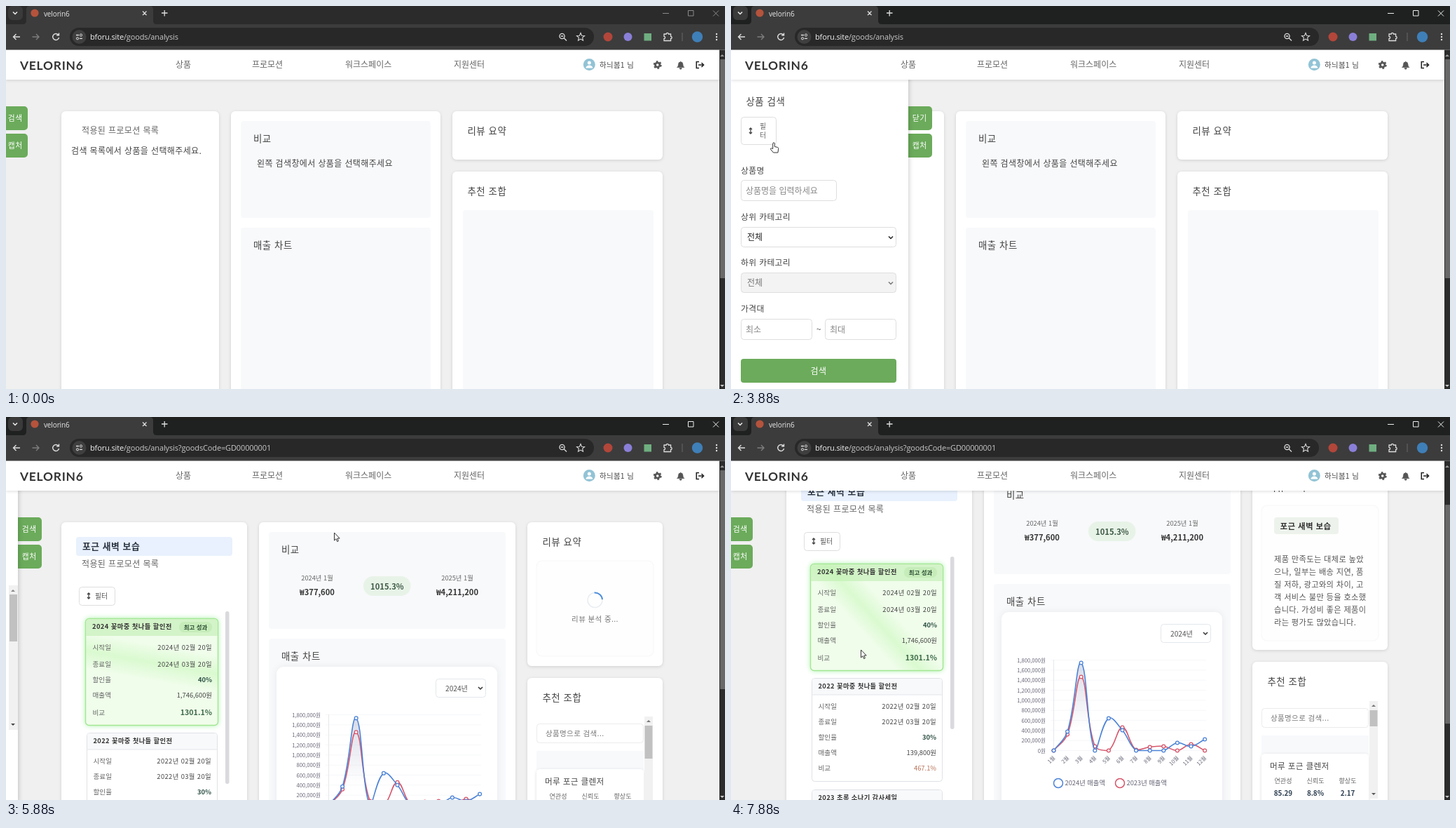
Recreate the animation shown at these times as an HTML page. Size 1026 by 546 pixels, loop 8000 ms.

```html
<!DOCTYPE html>
<html lang="ko">
<head>
<meta charset="utf-8">
<style>
html, body { margin: 0; width: 100%; height: 100%; overflow: hidden; background: #f0f0f0 }
svg { display: block }
text { font-family: "Noto Sans CJK KR", "Noto Sans CJK", sans-serif; letter-spacing: .38px; white-space: pre }
.b { font-weight: 700 }
.m { text-anchor: middle }
.e { text-anchor: end }
.n { letter-spacing: 0 }
.h { letter-spacing: .55px }
.u { font-family: "Open Sans", sans-serif; letter-spacing: -.14px }
.logo { font-family: Lato, sans-serif; letter-spacing: .75px; font-weight: 700 }
.card { filter: drop-shadow(0 1px 2px #0002) }
.soft { filter: drop-shadow(0 0 5px #0001) }
.panel { filter: drop-shadow(1px 0 3px #0003) }
.glow { filter: drop-shadow(0 0 3.5px #90ee90b0) }
</style>
</head>
<body>
<svg id="stage" width="1026" height="546" viewBox="0 0 1026 546"></svg>
<script>
const stage = document.getElementById('stage');
const TICKS = 56, LOOP = 8000, GREEN = '#6bab5b', PALE = '#f8f9fb';
const PRODUCT = '포근 새벽 보습';

const T = (x, y, s, size = 12, fill = '#444', cls = '') =>
  `<text x="${x}" y="${y}" font-size="${size}" fill="${fill}" class="${cls}">${s}</text>`;
const R = (x, y, w, h, fill, r = 0, more = '') =>
  `<rect x="${x}" y="${y}" width="${w}" height="${h}" rx="${r}" fill="${fill}" ${more}/>`;
const C = (x, y, r, fill, more = '') => `<circle cx="${x}" cy="${y}" r="${r}" fill="${fill}" ${more}/>`;
const L = (d, stroke, w = 1.3, fill = 'none') =>
  `<path d="${d}" fill="${fill}" stroke="${stroke}" stroke-width="${w}"/>`;
const G = (x, y, body, more = '') => `<g transform="translate(${x} ${y}) ${more}">${body}</g>`;
const card = (x, y, w, h) => R(x, y, w, h, '#fff', 6, 'class="card"');
const outline = (x, y, w, h, fill = '#fff', line = '#dedede') =>
  R(x + .5, y + .5, w - 1, h - 1, fill, 4, `stroke="${line}"`);
const chevron = (x, y, color = '#333') => G(x, y, L('M-3-1.5 0 1.5 3-1.5', color, 1.5));
const tri = (x, y, up, color) => L(`M${x - 3} ${y}h6l-3 ${up ? -3 : 3}z`, 'none', 0, color);
const updown = (x, y) => L(`M${x} ${y - 4}v8m-2-6 2-2 2 2m-4 4 2 2 2-2`, '#444', 1.3);

// Linear interpolation through [tick, ...values] keys
function at(k, keys) {
  const i = keys.findIndex(key => key[0] >= k);
  if (i < 0) return keys.at(-1).slice(1);
  if (i === 0) return keys[0].slice(1);
  const a = keys[i - 1], b = keys[i], p = (k - a[0]) / (b[0] - a[0]);
  return a.slice(1).map((v, j) => v + (b[j + 1] - v) * p);
}

const cursorKeys = [[1, 955, 420], [3, 700, 330], [5, 330, 230], [7, 60, 165], [9, 14, 158], [10, 40, 158],
  [11, 88, 158], [14, 75, 170], [17, 60, 190], [20, 56, 184], [24, 57, 182], [27, 61, 195], [29, 125, 514],
  [30, 125, 514], [32, 123, 330], [33, 121, 284], [36, 121, 284], [39, 264, 158], [40, 370, 158],
  [41, 468, 165], [47, 471, 165], [55, 185, 332]];
const handSpans = [[8, 9], [17, 27], [29, 30], [33, 36], [39, 39]];
const edgeKeys = [[8, -3], [9, 30], [10, 195], [11, 251], [12, 253], [39, 253], [40, 130], [41, 17], [42, -3]];
const scrollKeys = [[42, 0], [44, 26], [46, 69], [47, 78]];
const shineKeys = [[36, 150, 310, 20], [41, 180, 345, 10], [46, 290, 430, -26], [55, 215, 377, 48]];

const defs = `<defs>
  <linearGradient id="fade" x2="0" y2="1"><stop stop-color="#8088b0" stop-opacity=".3"/><stop offset=".75" stop-color="#8088b0" stop-opacity="0"/></linearGradient>
  <linearGradient id="bar"><stop stop-color="#6c9fe0"/><stop offset="1" stop-color="#3f70b8"/></linearGradient>
  <linearGradient id="band" x2="0" y2="1"><stop stop-color="#b9f5a8" stop-opacity="0"/><stop offset=".5" stop-color="#b9f5a8" stop-opacity=".4"/><stop offset="1" stop-color="#b9f5a8" stop-opacity="0"/></linearGradient>
  <clipPath id="promo"><rect x="114" y="288" width="188" height="151" rx="5"/></clipPath>
</defs>`;

function spinner(x, y, r, k) {
  const c = r * .707, turn = 63 * (k - 41) + (k < 36 ? 18 : 40);
  return G(x, y, C(0, 0, r, 'none', 'stroke="#e9edf2" stroke-width="1.6"') +
    L(`M${-c} ${-c}A${r} ${r} 0 0 1 ${c} ${-c}`, '#4a8ddc', 2), `rotate(${turn})`);
}

// Smooth line with neighbour-weighted control points, kept above the base line
function curve(pts, base) {
  const ctrl = pts.map((p, i) => {
    const a = pts[i - 1] || p, b = pts[i + 1] || p;
    const da = Math.hypot(p[0] - a[0], p[1] - a[1]), db = Math.hypot(b[0] - p[0], b[1] - p[1]);
    const move = f => [p[0] + f * (b[0] - a[0]), Math.min(base, p[1] + f * (b[1] - a[1]))];
    return [move(-.4 * da / (da + db)), move(.4 * db / (da + db))];
  });
  return 'M' + pts[0] + pts.slice(1).map((p, i) => `C${ctrl[i][1]} ${ctrl[i + 1][0]} ${p}`).join('');
}

function chart(k) {
  const base = 553.5, grow = 1 - (1 - Math.min(1, (k - 36) / 7)) ** 4;
  const plot = heights => heights.map((h, i) => [460.5 + 19.6 * i, base - h * grow]);
  const blue = plot([0, 27, 125, 0, 46, 29, 0, 0, 0, 11, 6, 16]);
  const red = plot([0, 23, 105, 6, 0, 33, 1, 5, 6, 0, 9, 0]);
  let out = '';
  for (let i = 0; i < 10; i++) {
    const y = base - 14.33 * i;
    out += L(`M456 ${y}H678`, '#f6f7f9', 1) +
      T(449, y + 3, i ? (i * 200000).toLocaleString('en-US') + '원' : '0원', 7.6, '#667', 'e n');
  }
  out += L(`M460.5 424V${base}`, '#e6e8ec', 1) + L(curve(blue, base) + `V${base}H460.5z`, 'none', 0, 'url(#fade)');
  for (const [pts, color] of [[red, '#d6566b'], [blue, '#4c83d6']])
    out += L(curve(pts, base), color, 1.6) +
      pts.map(p => C(...p, 2.4, '#fff', `stroke="${color}" stroke-width="1.3"`)).join('');
  for (let i = 0; i < 12; i++)
    out += G(463 + 19.6 * i, 564.5, T(0, 0, i + 1 + '월', 7.6, '#667', 'e n'), 'rotate(-45)');
  [['#4c83d6', 467, 2024], ['#d6566b', 555, 2023]].forEach(([color, x, year]) => {
    out += C(x, 600, 6.5, '#fff', `stroke="${color}" stroke-width="1.5"`) + T(x + 9.5, 603, year + '년 매출액', 9.3, '#667', 'n');
  });
  return out;
}

function frame(leftW, midX, midW, rightX, split) {
  const w = 937 - rightX;
  return card(79, 150, leftW, 700) + card(midX, 150, midW, 700) +
    R(midX + 14, 164, midW - 28, 138, PALE, 4) + R(midX + 14, 316, midW - 28, 500, PALE, 4) +
    T(midX + 32, 194, '비교', 13.4, '#444', 'h') + T(midX + 32, 346, '매출 차트', 13.4, '#444', 'h') +
    card(rightX, 150, w, split - 150) + card(rightX, split + 17, w, 500) +
    T(rightX + 21.5, 183, '리뷰 요약', 13.4, '#444', 'h') + T(rightX + 21.5, split + 50, '추천 조합', 13.4, '#444', 'h');
}

const yearBox = x => R(x - 227, 356, 315, 284, '#fff', 10, 'class="soft"') + outline(x, 373, 72, 27, '#fff', '#e3e7ec') +
  T(x + 14, 390.5, '2024년', 10.2, '#555', 'n') + chevron(x + 64, 386.5);

const reviewWait = (x, k) => R(x, 205, 207 - (x - 717), 136, '#fefefe', 8, 'stroke="#f7f7f7"') +
  spinner((x + 924) / 2, 261, 10.5, k) + T((x + 924) / 2, 292, '리뷰 분석 중...', 10.5, '#777', 'm');

const emptyPage = () => frame(225, 321, 299, 637, 219) +
  T(108, 182, '적용된 프로모션 목록', 12, '#666') + T(93, 211, '검색 목록에서 상품을 선택해주세요.') +
  T(358, 229, '왼쪽 검색창에서 상품을 선택해주세요') + R(652, 291, 272, 500, PALE, 4);

const loadingPage = k => frame(225, 321, 366, 704, 355) + R(93, 204, 186, 181, '#fff', 8, 'stroke="#f5f5f5"') +
  T(358, 229, '데이터를 불러오는 중...', 12, '#444', 'n') + yearBox(573) + spinner(504, 513, 12, k) +
  reviewWait(717, k) + R(718, 427, 206, 400, PALE, 4) + T(763, 467, '데이터를 불러오는 중...', 12, '#666', 'n');

function promoRows(year, y, [rate, sales, diff], color, big) {
  const x = big ? 123.5 : 124.5, right = big ? 294 : 293, steps = big ? [0, 24, 46, 68, 93] : [0, 22, 44.5, 66.5, 88.5];
  const values = [`${year}년 02월 20일`, `${year}년 03월 20일`, rate, sales, diff];
  return ['시작일', '종료일', '할인율', '매출액', '비교'].map((label, i) =>
    T(x, y + steps[i], label, 9.6, '#666', 'n') +
    T(right, y + steps[i], values[i], i === 4 && big ? 10.7 : 9.4, i === 4 ? color : i === 2 ? '#2d5045' : '#444',
      i < 2 ? 'e' : i === 2 || i === 4 && big ? 'e b n' : 'e n')).join('');
}

function promoHead(y, title) {
  return outline(115, y, 187, 148, '#fff', '#dfe1e5') + R(116, y + 1, 185, 23, PALE, 3) +
    L(`M115.5 ${y + 24}h186`, '#e3e5e9', 1) + T(124.5, y + 15, title, 9.3, '#333', 'b');
}

function leftColumn(k) {
  const [sx, sy, angle] = at(k, shineKeys);
  return R(100, 171, 223, 27, '#e8f1fd', 4) + T(109, 188.5, PRODUCT, 12.8, '#2b3440', 'b h') +
    T(108, 214, '적용된 프로모션 목록', 12, '#666') +
    outline(104, 242, 52, 27) + updown(118, 255) + T(127, 259, '필터', 9.8, '#555', 'n') +
    R(313, 277, 5.5, 246, '#dadade', 2.7) +
    R(113.5, 287.5, 189, 152, '#f0fdeb', 5, 'stroke="#a3e793" stroke-width="1.4" class="glow"') +
    `<g clip-path="url(#promo)">` + R(114, 288, 188, 24, '#d3f3c8') +
    G(sx, sy, R(-170, -26, 340, 52, 'url(#band)'), `rotate(${angle})`) + '</g>' +
    T(123, 302, '2024 꽃마중 첫나들 할인전', 9.4, '#333', 'b') +
    R(247, 292, 47, 15, '#c6ecba', 7) + T(270.5, 302.5, '최고 성과', 8.5, '#2f4f35', 'b m n') +
    promoRows(2024, 332, ['40%', '1,746,600원', '1301.1%'], '#3f6b4a', true) +
    promoHead(450, '2022 꽃마중 첫나들 할인전') +
    promoRows(2022, 493.5, ['30%', '139,800원', '467.1%'], '#b8735a', false) +
    promoHead(609, '2023 초록 소나기 감사세일');
}

const compare = () => T(444, 233, '2024년 1월', 9.3, '#666', 'm n') + T(444, 254, '₩377,600', 11.2, '#333', 'm b n') +
  R(510, 227, 67.5, 28, '#e8f3e8', 14) + T(543.8, 246, '1015.3%', 11.2, '#3d5a45', 'm b n') +
  T(644, 233, '2025년 1월', 9.3, '#666', 'm n') + T(644, 254, '₩4,211,200', 11.2, '#333', 'm b n');

const reviewText = ['제품 만족도는 대체로 높았', '으나, 일부는 배송 지연, 품', '질 저하, 광고와의 차이, 고',
  '객 서비스 불만 등을 호소했', '습니다. 가성비 좋은 제품이', '라는 평가도 많았습니다.'];

const review = () => R(757, 204, 167, 193, '#fefefe', 8, 'stroke="#f7f7f7"') + R(775, 221, 92, 24, '#edf3ec', 4) +
  T(783.5, 238, PRODUCT, 11.5, '#333', 'b') + reviewText.map((s, i) => T(775, 285 + 18 * i, s, 11.2, '#555')).join('');

function picks(shrunk) {
  const end = shrunk ? 566 : 622;
  const scores = [['연관성', '85.29'], ['신뢰도', '8.8%'], ['향상도', '2.17']];
  return outline(757, 437, 153, 28, '#fff', '#ebebeb') + T(770, 455, '상품명으로 검색...', 10.5, '#777') +
    R(757, 476, 153, 27, PALE) + R(757, 605, 153, 40, PALE) + R(757, 502, 153, 103, '#fff', 5, 'class="card"') +
    T(769, 523.5, '머루 포근 클렌저', 11.6) +
    scores.map(([label, value], i) => T(788 + 46 * i, 544, label, 9, '#666', 'm n') +
      T(788 + 46 * i, 561.5, value, 9.8, '#2c3e50', 'm b n')).join('') +
    R(769, 576, 130, 17, '#efefef', 8.5) + L('M777.5 576H848v17H777.5a8.5 8.5 0 0 1 0-17', 'none', 0, 'url(#bar)') +
    T(834, 588, '종합: 61.3', 9, '#b5783f', 'm n') +
    R(911, 427, 12, end - 427, '#f1f1f1') + tri(917, 435, true, '#777') +
    R(911.5, 440, 11, shrunk ? 23 : 47, '#c1c1c1') + tri(917, end - 8, false, '#555');
}

function loadedPage(k) {
  const done = k >= 47;
  return frame(265, 361, 366, 744, done ? 410 : 355) + leftColumn(k) + compare() + yearBox(613) + chart(k) +
    (done ? review() : reviewWait(757, k)) + G(0, done ? 56 : 0, picks(done));
}

const field = (x, y, w, hint) => outline(x, y, w, 30) + T(x + 7, y + 19.5, hint, 12, '#888', 'n');
const select = (y, off) => outline(14, y, 222, 29, off ? '#f3f3f3' : '#fff') +
  T(23, y + 19, '전체', 12, off ? '#777' : '#222', 'n') + chevron(228, y + 15, off ? '#777' : '#222');

const form = height => `<svg x="0" y="220" width="253" height="${height}" viewBox="0 220 253 ${height}">` +
  T(14, 239, '상품명', 11.8) + field(14, 248, 137, '상품명을 입력하세요') +
  T(14, 305, '상위 카테고리', 11.8) + select(315, false) + T(14, 370, '하위 카테고리', 11.8) + select(380, true) +
  T(14, 436, '가격대', 11.8) + field(14, 446, 102, '최소') + T(122, 465, '~') + field(134, 446, 102, '최대') +
  R(14, 503, 222, 34, GREEN, 4) + T(125, 524.5, '검색', 12, '#fff', 'm') + '</svg>';

function list(k) {
  const items = [[PRODUCT, '32,500원'], ['립밤 노을 탄력', '26,900원'], ['여성풋크림 이슬 보호', '49,800원'], ['트래블키트 노을 매끈한', '56,400원']];
  return items.map(([name, price], i) => {
    const y = 258.5 + 48.3 * i, on = !i && k >= 33;
    return R(14.5, y, 208, 41, on ? '#f3f9f1' : '#fff', 5, on ? 'stroke="#5aa450" stroke-width="1.6" class="card"' : 'class="card"') +
      T(26, y + 24.5, name, 11.7) + T(211, y + 24.5, price, 11.5, GREEN, 'e n');
  }).join('') + R(240, 240, 13, 206, '#f1f1f1') + tri(246, 249, true, '#888') + R(241, 253, 11, 67, '#c1c1c1') + tri(246, 437, false, '#444');
}

function sidebar(k) {
  const edge = at(k, edgeKeys)[0], open = k >= 9 && k < 40;
  const height = at(k, [[18, 0], [21, 326], [30, 326], [31, 0]])[0];
  const tab = (y, s) => L(`M253 ${y}h29a5 5 0 0 1 5 5v24a5 5 0 0 1-5 5h-29z`, 'none', 0, GREEN) + T(269.3, y + 21, s, 10.8, '#fff', 'm h');
  return G(edge - 253, 0, tab(143, open ? '닫기' : '검색') + tab(182, '캡처') +
    (edge < 0 ? '' : R(-4, 100, 257, 450, '#fff', 0, 'class="panel"') + T(21.5, 141, '상품 검색', 13.4, '#444', 'h') +
      outline(14, 158, 51, 40) + updown(28, 178) + T(41, 175, '필', 9.8, '#666') + T(41, 188, '터', 9.8, '#666') +
      (height ? form(height) : '') + (k >= 31 ? list(k) : '')));
}

const nav = () => R(0, 62, 1018, 43, '#fff', 0, 'class="card"') + T(20, 91, 'VELORIN6', 17.4, '#333', 'logo') +
  [[242, '상품'], [351, '프로모션'], [484, '워크스페이스'], [639, '지원센터']].map(([x, s]) => T(x, 88, s, 12, '#666', 'n')).join('') +
  C(832.3, 83.5, 8.5, '#92c3d5') + C(832.3, 81, 2.5, '#fff') + L('M827.3 88.5a5 4 0 0 1 10 0z', 'none', 0, '#fff') +
  T(847, 88, '하늬봄1 님', 10.4, '#444') +
  C(929.7, 84, 3.2, 'none', 'stroke="#555" stroke-width="2.8"') +
  C(929.7, 84, 5, 'none', 'stroke="#555" stroke-width="2" stroke-dasharray="2.6 2.64"') +
  L('M957.5 87.5q2-1.5 2-4.5a3.2 3.2 0 0 1 6.4 0q0 3 2 4.5zM961 88.5h3.4a1.7 1.7 0 0 1-3.4 0M962.7 78.5v2', '#555', .6, '#555') +
  L('M989 79.5h-3.7v9h3.7M988 84h7.5m-3-3 3 3-3 3', '#222', 1.6);

function browser(k) {
  const active = k >= 9, ink = active ? '#eee' : '#8a8a8a';
  const url = 'bforu.site<tspan fill="#c8c8c8">/goods/analysis' + (k >= 34 ? '?goodsCode=GD00000001' : '') + '</tspan>';
  return R(0, 0, 1026, 27, active ? '#1f2020' : '#2b2b2b') + R(0, 26, 1026, 36.5, '#3c3c3c') +
    R(3, 0, 21, 20, '#3a3a3a', 6) + chevron(13, 10, '#eee') +
    L('M24 26q5 0 5-5V5q0-5 5-5H205q5 0 5 5V21q0 5 5 5z', 'none', 0, '#3c3c3c') +
    C(41, 10, 5.6, '#b5533c') + T(54, 14.5, 'velorin6', 10, '#e8e8e8', 'u') +
    L('M195 7.5l5.5 5.5m0-5.5-5.5 5.5M222 10h8.5M226.2 6v8.5', '#ddd') +
    L('M937 10.5h9M973.5 6.5h7.5v7.5h-7.5zM1009 6.5l8 8m0-8-8 8', ink, 1) +
    L('M20 44H10.5m4-4-4 4 4 4M75 41.5a4.5 4.5 0 1 0 .6 3.5M75.5 38.5v3.3h-3.3', '#ddd', 1.4) +
    L('M37.5 44H47m-4-4 4 4-4 4', '#7d7d7d', 1.4) +
    R(91, 31, 748, 26, '#282828', 13) + C(104.5, 44, 10, '#3f3f3f') +
    L('M100 41.5h4m5 4.8h-4.2', '#ddd') + C(107, 41.5, 1.6, 'none', 'stroke="#ddd"') + C(102, 46.3, 1.6, 'none', 'stroke="#ddd"') +
    T(120, 48, url, 11, '#f0f0f0', 'u') +
    C(793.5, 43, 3.6, 'none', 'stroke="#ddd" stroke-width="1.3"') + L('M796 45.5l4 4M791.8 43h3.4', '#ddd') +
    L('M820 38.5l1.6 3.7 4 .3-3 2.7.9 4-3.5-2.1-3.5 2.1.9-4-3-2.7 4-.3z', '#ddd', 1.1) +
    C(859, 44, 6.5, '#b2463a') + C(887.5, 44, 6, '#8a7fd8') + R(910.5, 39, 10.5, 10.5, '#6fae80') +
    L('M939 40h3.2a1.6 1.6 0 0 1 3.2 0h3.2v3.3a1.6 1.6 0 0 1 0 3.2v3h-9.6v-3a1.6 1.6 0 0 0 0-3.2z', '#ddd') +
    L('M965 38v12', '#666', 1) + C(986.5, 44, 7.7, '#3f7fb8') + [40, 44, 48].map(y => C(1014, y, 1.2, '#ddd')).join('');
}

const pageBar = scroll => R(1018, 62.5, 8, 484, '#2c2c2c') + tri(1022, 72, true, '#999') +
  R(1019, 76 + scroll * .63, 7, 312, '#686868') + tri(1022, 540, false, '#ccc');

function cursor(k) {
  if (!k) return '';
  const hand = handSpans.some(([a, b]) => k >= a && k <= b);
  return G(...at(k, cursorKeys), hand
    ? L('M-1.3 8.5V1.2a1.3 1.3 0 0 1 2.6 0V5.5l4 .9q1.6.4 1.4 2.2l-.8 5.4H-.5L-4.4 9.4q-.6-1.6.9-1.6z', '#333', 1, '#fff')
    : L('M.5 0V11L3 8.7l1.7 3.9 1.7-.8L4.8 8h3.4z', '#333', 1, '#fff'));
}

function scene(k) {
  const scroll = at(k, scrollKeys)[0];
  const page = k < 34 ? emptyPage() : k < 36 ? loadingPage(k) : loadedPage(k);
  return defs + R(0, 0, 1026, 546, '#f0f0f0') + G(0, -scroll, page) + sidebar(k) + nav() + pageBar(scroll) + browser(k) + cursor(k);
}

// The screen refreshes in even ticks, so redraw only when the tick changes
let shown = -1;
function draw(now) {
  const k = Math.min(TICKS - 1, Math.floor((now % LOOP + 35) * TICKS / LOOP));
  if (k !== shown) stage.innerHTML = scene(shown = k);
  requestAnimationFrame(draw);
}
draw(0);
</script>
</body>
</html>
```
